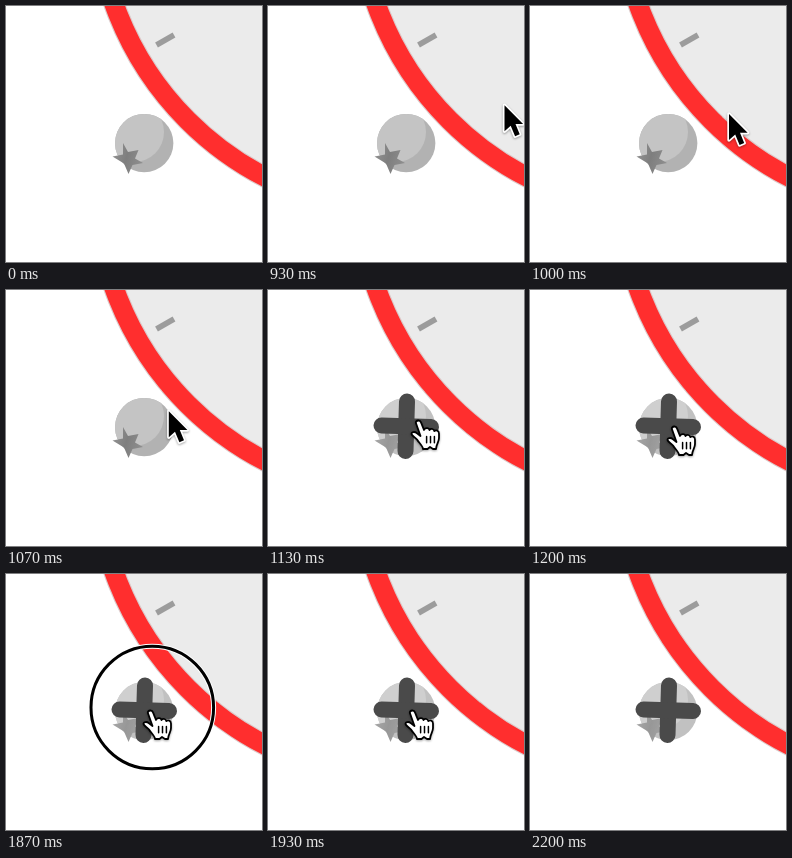
An HTML page for the animation above (2740 ms loop, 256 by 256 pixels).

```html
<!DOCTYPE html>
<html lang="en">
<head>
<meta charset="utf-8">
<title>Hover and click</title>
<style>
  html, body { margin: 0; width: 100%; height: 100%; overflow: hidden; background: #fff; }
  svg { display: block; width: 100vw; height: 100vh; }
  .cursor { filter: drop-shadow(0 1.5px 1.2px rgba(0, 0, 0, .35)); }
</style>
</head>
<body>
<svg viewBox="0 0 256 256">
  <defs>
    <clipPath id="ballClip"><circle cx="138.2" cy="137.1" r="29.2"/></clipPath>
    <linearGradient id="starFill" x1="0" y1="0" x2="1" y2="0.3">
      <stop offset="0" stop-color="#969696"/>
      <stop offset="0.55" stop-color="#7e7e7e"/>
      <stop offset="1" stop-color="#8c8c8c"/>
    </linearGradient>
  </defs>

  <!-- clock face with a soft rim -->
  <circle cx="403" cy="-107" r="313" fill="#ebebeb" stroke="#dccaca" stroke-width="21.6"/>
  <circle cx="403" cy="-107" r="313" fill="none" stroke="#ff2e2e" stroke-width="19.4"/>
  <path d="M150.5 39 L168 29" stroke="#9c9c9c" stroke-width="5.6"/>

  <g id="ball">
    <circle cx="138.2" cy="137.1" r="29.2" fill="#b2b2b2"/>
    <circle cx="128" cy="126" r="30" fill="#c4c4c4" clip-path="url(#ballClip)"/>
    <path fill="url(#starFill)" d="M117 137 L122 146 L132.5 144 L129 152.5 L137 157 L126.5 159 L122.5 168 L118 157.5 L106.5 150.5 L117 148.5 Z"/>
  </g>

  <g id="cross" stroke="#4a4a4a" stroke-width="16" stroke-linecap="round">
    <path d="M139 111.5 L137.5 161"/>
    <path d="M113.5 135.5 L163 137"/>
  </g>

  <g id="pulse" fill="none">
    <circle cx="146.3" cy="133.5" r="61.3" stroke="#fff" stroke-width="5"/>
    <circle cx="146.3" cy="133.5" r="61.3" stroke="#000" stroke-width="3"/>
  </g>

  <g id="arrow" class="cursor">
    <path d="M0 0 V26 L6.2 20.4 L10.6 31 L15.2 29 L11 18.8 H18.6 Z" stroke="#fff" stroke-width="3.4" stroke-linejoin="round" paint-order="stroke"/>
  </g>

  <!-- hotspot at the fingertip -->
  <g id="hand" class="cursor" stroke="#000" stroke-linejoin="round" stroke-linecap="round">
    <path fill="#fff" stroke-width="1.8" d="M-2.2 1.8 C-2 -1 2 -1.4 3 1.4 L6 9 C7 6.5 11 6.5 11.5 9 C13 7 16 8 16.3 10 C18 8.6 21 9.4 21 12.5 V17 C21 21 18.4 22.5 18 28 H15 L12 26 L9.5 28 H5 C5 25 1 22 -1 18.5 C-2.5 16.5 -6 15 -6.5 13 C-6.5 10.5 -3 10.5 -1 12.2 L2.5 15 Z"/>
    <path fill="none" stroke-width="1.5" d="M8.6 15.4 V21.8 M12.5 15.4 V21.8 M16.4 15.4 V21.8"/>
  </g>
</svg>
<script>
  const LOOP = 2740;
  // start time, pointer kind, x, y, click ring
  const STEPS = [
    [0, ''],
    [930, 'arrow', 236.5, 99.3],
    [1000, 'arrow', 199, 108],
    [1070, 'arrow', 162.8, 121.3],
    [1130, 'hand', 150, 131],
    [1200, 'hand', 144, 137],
    [1870, 'hand', 144, 137, true],
    [1930, 'hand', 144, 137],
    [2200, 'none']
  ];
  const [ball, cross, pulse, arrow, hand] =
    ['ball', 'cross', 'pulse', 'arrow', 'hand'].map(id => document.getElementById(id));
  const show = (el, on) => el.setAttribute('visibility', on ? 'visible' : 'hidden');

  function draw(time) {
    const [, kind, x = 0, y = 0, ring] = STEPS.findLast(step => step[0] <= time);
    const hovered = kind === 'hand' || kind === 'none';
    for (const el of [arrow, hand]) {
      el.setAttribute('transform', `translate(${x} ${y})`);
      show(el, el.id === kind);
    }
    show(cross, hovered);
    show(pulse, ring);
    ball.setAttribute('opacity', hovered ? 0.8 : 1);
  }

  const start = performance.now();
  function tick() {
    draw((performance.now() - start) % LOOP);
    requestAnimationFrame(tick);
  }
  tick();
</script>
</body>
</html>
```
